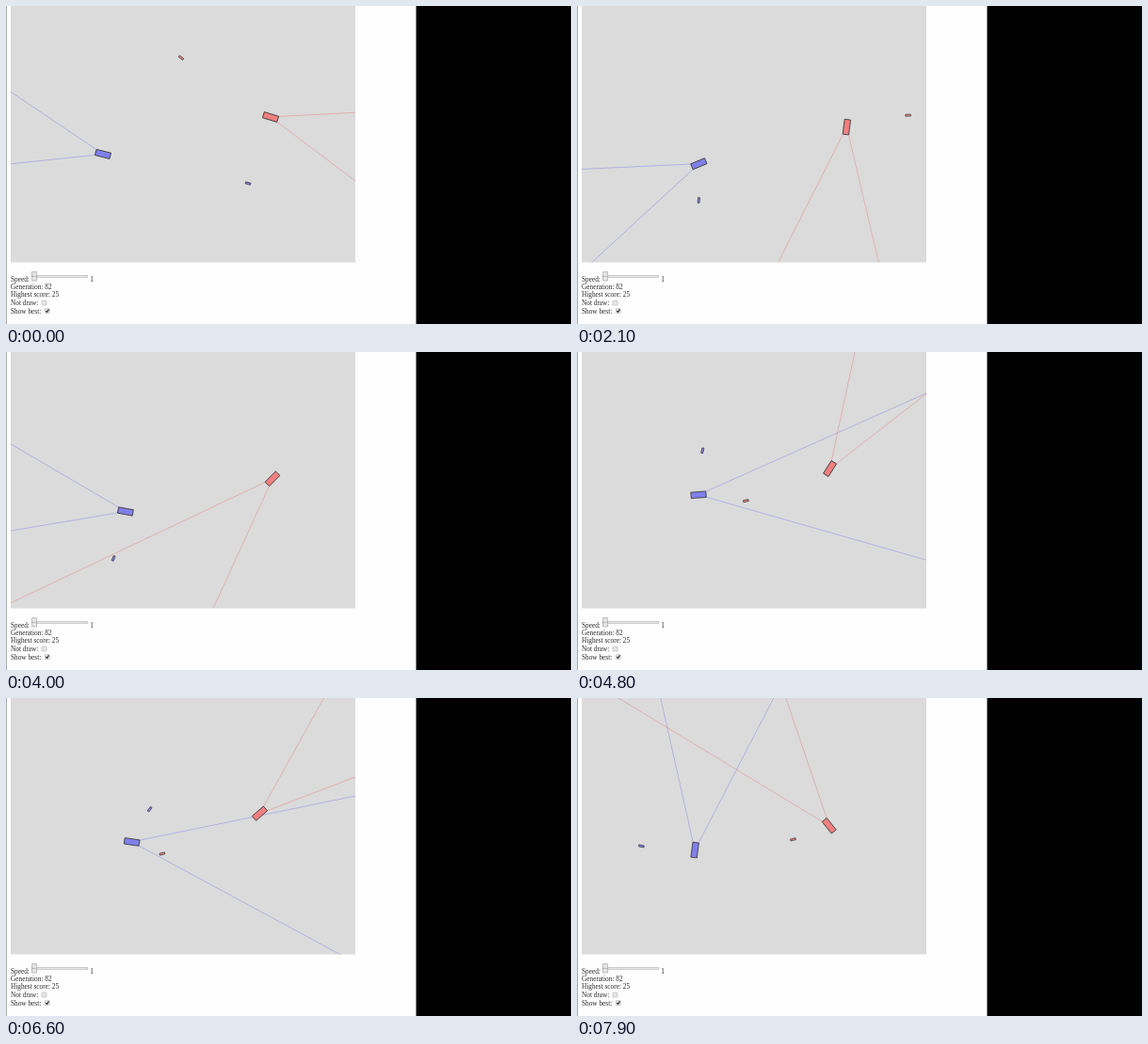
An HTML page for the animation above (8 s loop, 600 by 338 pixels).

```html
<!DOCTYPE html>
<html lang="en">
<head>
<meta charset="utf-8">
<title>Tank duel</title>
<style>
  html, body { margin: 0; width: 100%; height: 100%; overflow: hidden; background: #000; }
  svg { display: block; }
  text { font: 7.3px "Liberation Serif", "Times New Roman", serif; fill: #2a2a2a; }
  .tank { stroke: #3c3c3c; stroke-width: .85; }
  .sight { stroke-width: .65; opacity: .5; fill: none; }
  .shell { stroke: #3c3c3c; stroke-width: .7; }
  .control { fill: #e6e6e6; stroke: #b4b4b4; stroke-width: .6; }
</style>
</head>
<body>
<svg width="600" height="338" viewBox="0 0 600 338">
  <rect width="600" height="338"/>
  <rect width="435.5" height="338" fill="#fefefe"/>
  <rect width="1" height="338" fill="#aaa"/>
  <svg id="field" x="5" y="0" width="366" height="272.4" viewBox="5 0 366 272.4" overflow="hidden">
    <rect x="5" width="366" height="273" fill="#dbdbdb"/>
  </svg>
  <text x="5" y="292.8">Speed:</text>
  <rect class="control" x="27.3" y="286.4" width="59.5" height="2"/>
  <path class="control" d="M27.6 282.6h5v9.4h-5zM27.6 287.4h5" style="stroke:#999"/>
  <text x="89.3" y="292.8">1</text>
  <text x="5" y="300.6">Generation: 82</text>
  <text x="5" y="309">Highest score: 25</text>
  <text x="5" y="318">Not draw:</text>
  <rect class="control" x="38" y="313" width="5" height="5" rx=".6"/>
  <text x="5" y="327">Show best:</text>
  <rect class="control" x="41.3" y="321.6" width="5" height="5" rx=".6"/>
  <path d="M42.3 324l1.2 1.4 2-3" fill="none" stroke="#222" stroke-width="1.1"/>
</svg>
<script>
// Times are in seconds, lengths in pixels, angles in degrees.
const LOOP = 8, FRAME = .1, SIM_STEP = .005, RAD = Math.PI / 180;
const TANK_SPEED = 33, SHELL_SPEED = 158, RELOAD = .83, HIT_RADIUS = 8, SIGHT = 20;
const bounds = { left: 14, right: 366, top: 5, bottom: 269 };
const field = document.getElementById("field");

// legs: [duration, turn rate]; shell: the one already in flight
const blue = {
  fill: "#8080ec", line: "#6464e6", x: 103, y: 157.4, heading: 194, drift: [1.45, .6],
  legs: [[.86, 222], [.6, 0], [LOOP, 206.9]],
  shell: { x: 257, y: 188.5, heading: 16 }
};
const red = {
  fill: "#f08080", line: "#e66464", x: 281, y: 118, heading: 17, drift: [-.45, .44],
  legs: [[LOOP, 209.4]],
  shell: { x: 186, y: 55, heading: 217 }
};
const tanks = [blue, red];

function forward({ x, y, heading }, d) {
  return { x: x + d * Math.cos(heading * RAD), y: y + d * Math.sin(heading * RAD), heading };
}

function tankPose(tank, t) {
  let { x, y, heading } = tank, left = t;
  for (const [span, spin] of tank.legs) {
    const dt = Math.min(left, span);
    if (spin) {
      const r = TANK_SPEED / (spin * RAD), a = heading * RAD, b = a + spin * dt * RAD;
      x += r * (Math.sin(b) - Math.sin(a));
      y += r * (Math.cos(a) - Math.cos(b));
      heading += spin * dt;
    } else {
      ({ x, y } = forward({ x, y, heading }, TANK_SPEED * dt));
    }
    left -= dt;
  }
  return { x: x + tank.drift[0] * t, y: y + tank.drift[1] * t, heading };
}

const shellPose = (shot, t) => forward(shot.from, SHELL_SPEED * (t - shot.time));

function isSpent(shell, enemy) {
  return shell.x < bounds.left || shell.x > bounds.right ||
    shell.y < bounds.top || shell.y > bounds.bottom ||
    Math.hypot(shell.x - enemy.x, shell.y - enemy.y) < HIT_RADIUS;
}

// A tank fires straight ahead once its last shell is spent and it has reloaded.
function planShots(tank, enemy) {
  let shot = { time: 0, from: tank.shell, end: Infinity };
  const shots = [shot];
  for (let i = 1; i * SIM_STEP < LOOP; i++) {
    const t = i * SIM_STEP;
    if (t < shot.end && isSpent(shellPose(shot, t), tankPose(enemy, t))) shot.end = t;
    if (t >= shot.end && t >= shot.time + RELOAD || t >= shot.end && shot === shots[0]) {
      shot = { time: t, from: tankPose(tank, t), end: Infinity };
      shots.push(shot);
    }
  }
  return shots;
}

function addGroup(markup) {
  const g = document.createElementNS("http://www.w3.org/2000/svg", "g");
  g.innerHTML = markup;
  return field.appendChild(g);
}

function place(g, { x, y, heading }) {
  g.setAttribute("transform", `translate(${x} ${y}) rotate(${heading})`);
}

const ray = forward({ x: 0, y: 0, heading: SIGHT }, 500);
for (const tank of tanks) {
  tank.shots = planShots(tank, tank === blue ? red : blue);
  tank.shellGroup = addGroup(
    `<rect class="shell" x="-2.8" y="-1" width="5.6" height="2" fill="${tank.fill}"/>`);
  tank.bodyGroup = addGroup(
    `<path class="sight" stroke="${tank.line}" d="M8 -3l${ray.x} ${-ray.y}M8 3l${ray.x} ${ray.y}"/>` +
    `<rect class="tank" x="-8" y="-3.2" width="16" height="6.4" fill="${tank.fill}"/>`);
}

function draw(seconds) {
  const t = Math.floor(seconds % LOOP / FRAME + 1e-6) * FRAME;
  for (const tank of tanks) {
    const shot = tank.shots.findLast(s => s.time <= t);
    place(tank.bodyGroup, tankPose(tank, t));
    place(tank.shellGroup, shellPose(shot, t));
    tank.shellGroup.setAttribute("visibility", t < shot.end ? "visible" : "hidden");
  }
}

let begin;
function tick(now) {
  begin ??= now;
  draw((now - begin) / 1000);
  requestAnimationFrame(tick);
}
draw(0);
requestAnimationFrame(tick);
</script>
</body>
</html>
```
